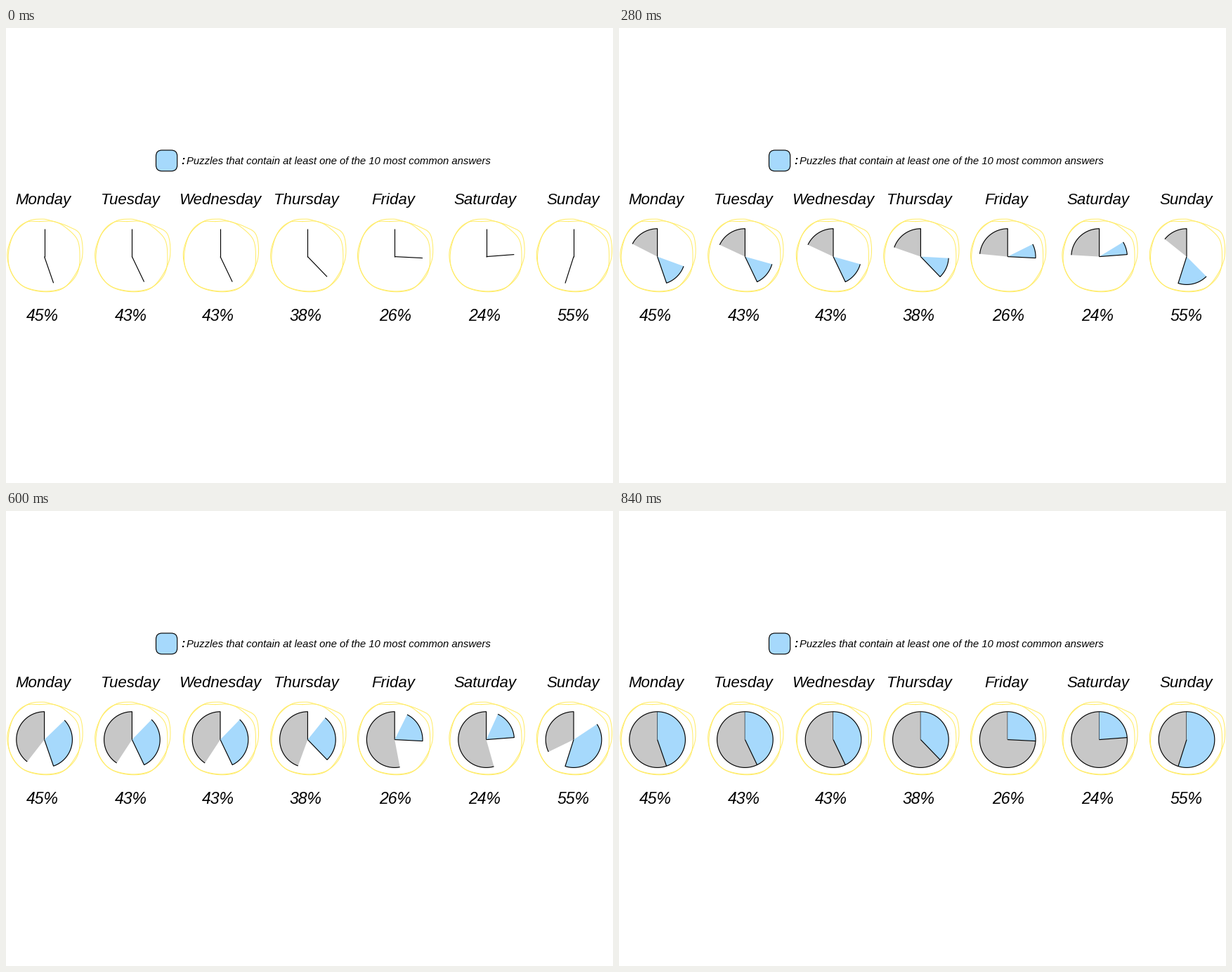
These frames come from a looping animation (864x648 px, 1000 ms). A matplotlib script:

```python
import numpy as np
import matplotlib.pyplot as plt
from matplotlib.animation import FuncAnimation
from matplotlib.patches import FancyBboxPatch, Polygon

W, H, DPI = 864, 648, 72
FRAMES, INTERVAL = 25, 40
BLUE, GREY, YELLOW, INK = "#a6d9fc", "#c7c7c7", "#ffec66", "#000000"
RADIUS, CENTER_Y = 39.8, 325.6

# day, share of puzzles in percent, pie centre x, title centre x, label centre x
DAYS = [
    ("Monday", 44.7, 54.6, 53, 51.5),
    ("Tuesday", 42.9, 179.4, 177, 178),
    ("Wednesday", 42.9, 305, 305, 301.5),
    ("Thursday", 37.8, 429.4, 427.3, 426),
    ("Friday", 25.8, 553.2, 551.7, 553.8),
    ("Saturday", 23.8, 683.6, 682, 681.3),
    ("Sunday", 54.9, 808, 807, 807.5),
]

# Two pen strokes of the hand-drawn ring, relative to the pie centre
OUTER_RING = [(-24, -50), (-4, -53.5), (10, -51), (34, -43), (51, -31),
              (54, 0), (43, 27), (25, 46), (-2, 50), (-29, 43),
              (-46, 25), (-51.5, 0), (-44, -31)]
INNER_RING = [(-7, -50), (14, -50), (31, -41), (47, -24), (50.5, 0),
              (47.5, 22), (36, 38), (20, 47), (-5, 49), (-32, 41),
              (-48, 20), (-52.5, -7), (-42, -35), (-26, -49)]

fig = plt.figure(figsize=(W / DPI, H / DPI), dpi=DPI, facecolor="white")
ax = fig.add_axes([0, 0, 1, 1])
ax.set_xlim(0, W)
ax.set_ylim(H, 0)
ax.axis("off")


def smooth_loop(points, steps=12):
    """Closed Catmull-Rom curve through the points."""
    p1 = np.array(points, float)[:, None, :]
    p0, p2, p3 = (np.roll(p1, shift, axis=0) for shift in (1, -1, -2))
    t = np.linspace(0, 1, steps, endpoint=False)[None, :, None]
    curve = 0.5 * (2 * p1 + (p2 - p0) * t
                   + (2 * p0 - 5 * p1 + 4 * p2 - p3) * t**2
                   + (3 * p1 - p0 - 3 * p2 + p3) * t**3)
    curve = curve.reshape(-1, 2)
    return np.vstack([curve, curve[:1]])


def write(x, y, text, size, align="center", **style):
    ax.text(x, y, text, fontsize=size, ha=align, va="baseline", color=INK,
            family="Liberation Sans", **style)


def wedge_points(cx, start, sweep):
    """Centre followed by an arc; angles in turns clockwise from the top."""
    turns = 2 * np.pi * np.linspace(start, start + sweep, 90)
    arc = np.column_stack([cx + RADIUS * np.sin(turns),
                           CENTER_Y - RADIUS * np.cos(turns)])
    return np.vstack([[cx, CENTER_Y], arc])


def add_wedge(cx, start, sweep, color):
    patch = Polygon(wedge_points(cx, start, 0), closed=False, facecolor=color,
                    edgecolor=INK, linewidth=1.15, joinstyle="round", zorder=3)
    ax.add_patch(patch)
    return patch, cx, start, sweep


def progress(frame):
    return np.interp(frame, [0, 4, 7, 12, 15, 19, 21],
                     [0, 0.175, 0.316, 0.556, 0.714, 0.903, 1])


ax.add_patch(FancyBboxPatch((213.5, 174), 30.2, 29.8, facecolor=BLUE,
                            edgecolor=INK, linewidth=1.15,
                            boxstyle="round,pad=0,rounding_size=8.5"))
write(251.5, 194, ":", 16, weight="bold", style="italic")
write(257, 194.5,
      "Puzzles that contain at least one of the 10 most common answers",
      14.9, "left", style="italic")

wedges = []
for day, percent, cx, title_x, label_x in DAYS:
    for ring in (OUTER_RING, INNER_RING):
        x, y = smooth_loop(ring).T
        ax.plot(x + cx, y + CENTER_Y, color=YELLOW, linewidth=1, zorder=1)
    write(title_x, 250.7, day, 22.2, style="italic")
    write(label_x, 417.3, f"{percent:.0f}%", 23, style="italic")
    share = percent / 100
    wedges.append(add_wedge(cx, 0, share - 1, GREY))
    wedges.append(add_wedge(cx, share, -share, BLUE))


def update(frame):
    done = progress(frame)
    for patch, cx, start, sweep in wedges:
        patch.set_xy(wedge_points(cx, start, sweep * done))
    return [wedge[0] for wedge in wedges]


animation = FuncAnimation(fig, update, frames=FRAMES, interval=INTERVAL,
                          repeat=True, repeat_delay=0, blit=False)
plt.show()
```
